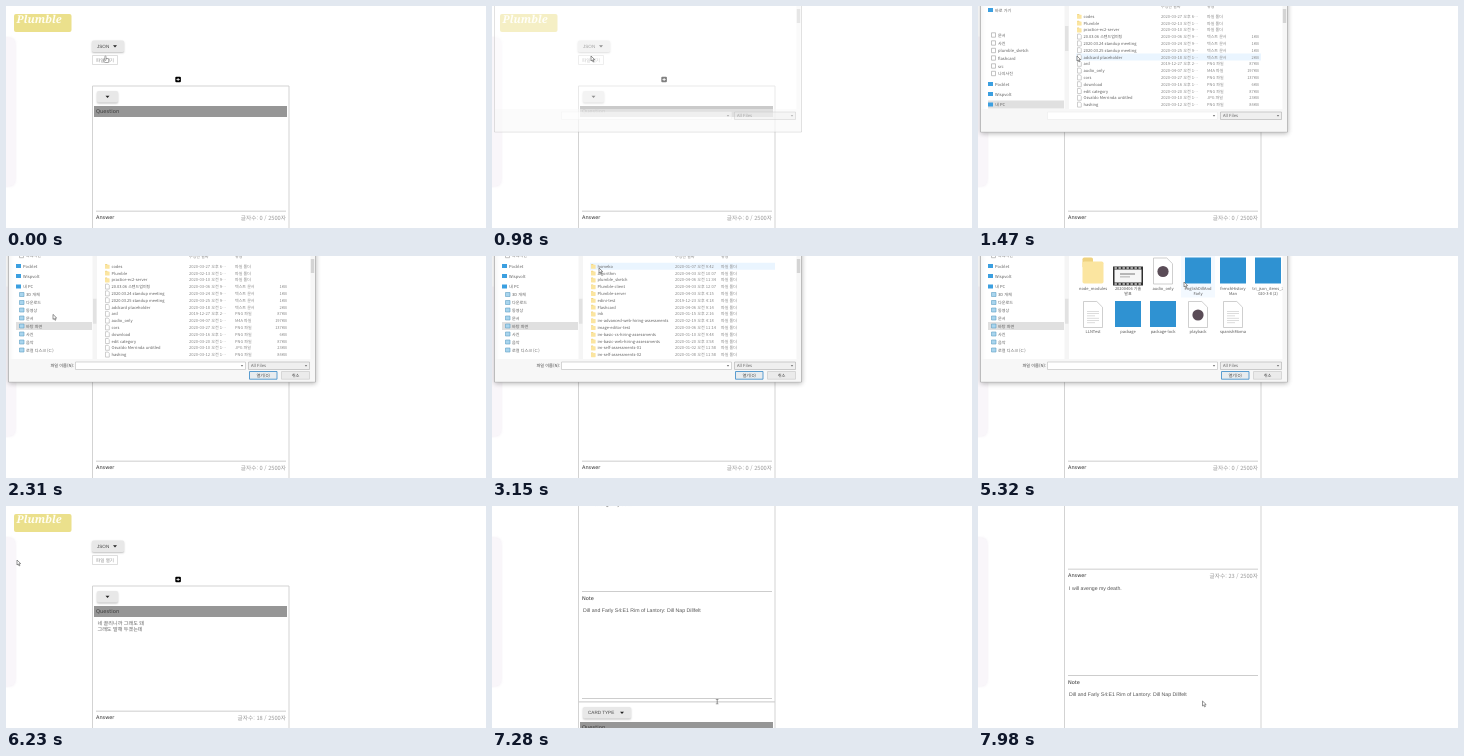
An HTML page with a canvas that plays this animation: 480 by 222 pixels, repeating every 8000 ms.

```html
<!DOCTYPE html>
<html lang="ko">
<head>
<meta charset="utf-8">
<title>Flashcard import</title>
<style>
html, body { margin: 0; width: 100%; height: 100%; overflow: hidden; background: #fff; }
canvas { display: block; width: 480px; height: 222px; }
</style>
</head>
<body>
<canvas id="stage" width="480" height="222"></canvas>
<script>
const ctx = document.getElementById('stage').getContext('2d');
const LOOP = 8000, STEP = 70;
const KR = '"Noto Sans CJK KR", "Noto Sans CJK JP", "Noto Sans CJK", sans-serif';
const WIDE = '"DejaVu Sans", sans-serif';
const UI = '"Liberation Sans", sans-serif';
ctx.textBaseline = 'middle';
ctx.textRendering = 'geometricPrecision';

function text(s, x, y, size = 4, color = '#606060', family = KR, align = 'left', style = '') {
  ctx.font = `${style} ${size}px ${family}`;
  ctx.fillStyle = color;
  ctx.textAlign = align;
  ctx.fillText(s, x, y);
}
function box(x, y, w, h, fill, stroke, radius = 0, line = 0.7) {
  ctx.beginPath();
  ctx.roundRect(x, y, w, h, radius);
  if (fill) { ctx.fillStyle = fill; ctx.fill(); }
  if (stroke) { ctx.strokeStyle = stroke; ctx.lineWidth = line; ctx.stroke(); }
}
function shape(points, fill, stroke) {
  ctx.beginPath();
  points.forEach(([x, y]) => ctx.lineTo(x, y));
  ctx.closePath();
  if (fill) { ctx.fillStyle = fill; ctx.fill(); }
  if (stroke) { ctx.strokeStyle = stroke; ctx.lineWidth = 0.7; ctx.stroke(); }
}
function disc(x, y, r, fill) {
  ctx.beginPath();
  ctx.arc(x, y, r, 0, 7);
  ctx.fillStyle = fill;
  ctx.fill();
}
function shadow(color, blur, dy, draw) {
  ctx.save();
  ctx.shadowColor = color;
  ctx.shadowBlur = blur;
  ctx.shadowOffsetY = dy;
  draw();
  ctx.restore();
}
function clipped(x, y, w, h, draw) {
  ctx.save();
  ctx.beginPath();
  ctx.rect(x, y, w, h);
  ctx.clip();
  draw();
  ctx.restore();
}
// Linear interpolation through [time, value, value...] keys.
function track(t, keys) {
  const i = keys.findIndex(k => k[0] > t);
  if (i < 0) return keys.at(-1).slice(1);
  if (i === 0) return keys[0].slice(1);
  const a = keys[i - 1], b = keys[i], p = (t - a[0]) / (b[0] - a[0]);
  return a.slice(1).map((v, n) => v + (b[n + 1] - v) * p);
}

// ---- Page ----
function dropButton(x, y, w, h, label) {
  shadow('rgba(0,0,0,.25)', 2, 1, () => box(x, y, w, h, '#e8e8e8', null, 1.5));
  const cy = y + h / 2, ax = label ? x + w - 9 : x + w / 2;
  if (label) text(label, x + 5, cy + 0.2, 4.6, '#444', UI);
  shape([[ax - 2, cy - 1], [ax + 2, cy - 1], [ax, cy + 1.2]], '#222');
}
function rule(y) { box(90, y, 190, 0.8, '#bdbdbd'); }

function card(y, { type, question = [], count = 0, answer = '', note = '' }) {
  box(86.5, y, 196.5, 342, '#fff', '#cfcfcf', 0, 0.9);
  dropButton(91, y + 5, type ? 48 : 21, 11.5, type);
  box(88, y + 20, 193, 11, '#969696');
  text('Question', 90, y + 25.7, 5.2, '#3c3c3c', WIDE);
  question.forEach((s, i) => text(s, 91.5, y + 37 + i * 6.2, 5.1));
  rule(y + 124.7);
  text('Answer', 90, y + 132, 5, '#333', WIDE);
  text(`글자수: ${count} / 2500자`, 280, y + 132, 5.7, '#999', KR, 'right');
  text(answer, 91, y + 144.3, 5.2, '#555', UI);
  rule(y + 231.3);
  text('Note', 90, y + 239, 5, '#333', WIDE);
  text(note, 91, y + 251, 5.2, '#555', UI);
  rule(y + 338);
}

function page(t, scroll) {
  const loaded = t >= 6160;
  ctx.save();
  ctx.translate(0, -scroll);
  box(8, 8, 57.5, 18, '#ebe08c', null, 2);
  text('Plumble', 10.5, 14, 10.8, '#fffef2', '"Noto Serif", serif', 'left', 'italic bold');
  dropButton(86, 34.5, 32, 11.5, 'JSON');
  box(86.5, 49.5, 25, 9, '#fff', '#d0d0d0');
  text('파일 열기', 99, 54, 4.5, '#888', KR, 'center');
  box(169.3, 70.7, 5.6, 5.6, '#000', null, 1);
  box(170.5, 73.1, 3.2, 0.8, '#fff');
  box(171.7, 71.9, 0.8, 3.2, '#fff');
  card(80, loaded ? {
    question: ['네 끌리니까 그래도 돼', '그래도 말해 두겠는데'],
    count: scroll ? 23 : 18,
    answer: 'I will avenge my death.',
    note: 'Dill and Farly S4:E1 Rim of Lantory: Dill Nap Dillfelt'
  } : {});
  if (loaded) card(422, { type: 'CARD TYPE' });
  ctx.restore();
  shadow('rgba(170,140,180,.2)', 3, 0, () => box(-8, 32, 17, 148, '#f9f6fa', null, 5));
}

// ---- File dialog ----
const sidebar = [
  [4, '바로 가기', 0], [29, '문서', 1], [37, '사진', 1], [44.5, 'plumble_sketch', 1],
  [52, 'flashcard', 1], [60, 'src', 1], [67.5, '나의사진', 1], [78, 'Pocklet', 0],
  [88, 'Wispvolt', 0], [98.5, '내 PC', 0], [106.5, '3D 개체', 1], [114.5, '다운로드', 1],
  [122, '동영상', 1], [130, '문서', 1], [138, '바탕 화면', 1], [146, '사진', 1],
  [154, '음악', 1], [162, '로컬 디스크 (C:)', 1]
];
const desktop = [
  ['codes', '03-27 오후 6'], ['Plumble', '02-13 오전 1'], ['practice-ec2-server', '03-10 오전 9'],
  ['20.03.06 스탠드업미팅', '03-06 오전 9', '텍스트 문서', '1KB'],
  ['2020.03.24 standup meeting', '03-24 오전 9', '텍스트 문서', '1KB'],
  ['2020.03.25 standup meeting', '03-25 오전 9', '텍스트 문서', '1KB'],
  ['addcard placeholder', '03-18 오전 1', '텍스트 문서', '2KB'],
  ['ard', '12-27 오후 2', 'PNG 파일', '87KB'], ['audio_only', '04-07 오전 1', 'M4A 파일', '197KB'],
  ['cors', '03-27 오전 1', 'PNG 파일', '137KB'], ['download', '03-16 오후 1', 'PNG 파일', '6KB'],
  ['edit category', '03-20 오전 1', 'PNG 파일', '87KB'],
  ['Osvaldo Merrinda untitled', '03-10 오전 1', 'JPG 파일', '23KB'],
  ['hashing', '03-12 오전 1', 'PNG 파일', '84KB']
];
const projects = [
  ['homeko', '01-07 오전 9:42'], ['algorithm', '04-03 오전 10:07'],
  ['plumble_sketch', '04-06 오전 11:34'], ['Plumble-client', '04-03 오후 12:07'],
  ['Plumble-server', '04-03 오후 4:15'], ['edini-test', '12-23 오후 4:18'],
  ['Flashcard', '04-06 오전 9:14'], ['ink', '01-15 오후 2:16'],
  ['im-advanced-web-hiring-assessments', '02-19 오후 4:18'],
  ['image-editor-test', '03-06 오전 11:14'], ['im-basic-cs-hiring-assessments', '01-10 오전 9:48'],
  ['im-basic-web-hiring-assessments', '01-20 오후 3:58'],
  ['im-self-assessments-01', '01-02 오전 11:58'], ['im-self-assessments-02', '01-08 오전 11:58']
];
const files = [
  ['folder', 'node_modules'], ['video', '20200406 기술', '발표'], ['audio', 'audio_only'],
  ['code', 'englishDillAnd', 'Farly'], ['code', 'frenchHistory', 'Man'],
  ['code', 'tri_json_items_2', '020-3-8 (2)'], ['text', 'LLNTest'], ['code', 'package'],
  ['code', 'package-lock'], ['audio', 'playback'], ['text', 'spanishMoma']
];

function folder(x, y, w, h) {
  box(x, y, w * 0.5, h * 0.4, '#efd27f', null, w / 12);
  box(x, y + h * 0.15, w, h * 0.85, '#fbe5a0', null, w / 12);
}
function sheet(x, y, w, h) {
  const fold = w * 0.3;
  shape([[x, y], [x + w - fold, y], [x + w, y + fold], [x + w, y + h], [x, y + h]], '#fff', '#bbb');
}

function drawSidebar(t) {
  const [scroll] = track(t, [[1890, 0], [2170, 68]]);
  const selected = t < 2240 ? 98.5 : 138;
  clipped(3, 0, 88, 103, () => {
    for (const [pageY, label, level] of sidebar) {
      const y = pageY - scroll, x = 10 + level * 3;
      if (pageY === selected) box(10, y - 4, 76, 8, '#e0e0e0');
      if (!level) box(x, y - 2, 5, 4, '#3b9fe0');
      else if (pageY < 70) box(x + 0.5, y - 2.2, 4, 4.4, '#fff', '#aaa');
      else box(x + 0.5, y - 2, 4.5, 4, '#a9d5ee', '#5f9fc4', 0, 0.6);
      text(label, x + 7, y, 4.1);
    }
  });
  box(86.5, 0, 4.5, 103, '#f5f5f5');
  box(87, 20 + scroll / 3, 3.5, 25, '#e2e2e2');
}

function drawRows(t, rows) {
  const hover = t < 1820 ? 6 : t < 2870 ? -1 : Math.floor(track(t, [[3290, 0], [4060, 6]])[0]);
  text('수정한 날짜', 183, 0.5, 4, '#888');
  text('유형', 229, 0.5, 4, '#888');
  rows.forEach(([name, date, kind = '파일 폴더', size = ''], i) => {
    const y = 10.2 + i * 6.8;
    if (i === hover) box(98, y - 3.5, 185, 7, t >= 4340 ? '#cce8ff' : '#eaf5ff');
    if (kind === '파일 폴더') folder(99, y - 2.2, 4.6, 4.8);
    else sheet(99.5, y - 2.5, 3.8, 5);
    text(name, 105.5, y);
    const year = date.startsWith('12') ? 2019 : 2020;
    text(`${year}-${date}${rows === desktop ? '…' : ''}`, 183, y, 4.1, '#888');
    text(kind, 229, y, 4, '#888');
    text(size, 281, y, 4, '#888', KR, 'right');
  });
}

function drawIcons(t) {
  files.forEach(([kind, name, more], i) => {
    const x = 115 + i % 6 * 35, y = i < 6 ? 14.5 : 58;
    if (i === 3) box(x - 17, y - 17, 34, 44, t >= 5530 ? '#cce8ff' : '#f3f9ff');
    if (kind === 'folder') folder(x - 10.5, y - 13, 21, 26);
    if (kind === 'code') box(x - 13, y - 13, 26, 26, '#2f92d2');
    if (kind === 'video') {
      box(x - 15, y - 4, 30, 19, '#303030');
      box(x - 13.5, y - 1, 27, 13, '#f6f6f6');
      for (let n = 0; n < 7; n++) {
        box(x - 13.5 + n * 4, y - 3.2, 2.4, 1.4, '#ddd');
        box(x - 13.5 + n * 4, y + 12.8, 2.4, 1.4, '#ddd');
      }
      box(x - 8, y + 3, 15, 1, '#777');
      box(x - 8, y + 6, 10, 0.8, '#999');
    }
    if (kind === 'audio' || kind === 'text') sheet(x - 9.5, y - 12.5, 19, 26);
    if (kind === 'audio') disc(x, y + 1, 5.6, '#5a4c57');
    if (kind === 'text') for (let n = 0; n < 6; n++) box(x - 6, y - 3 + n * 2.3, n % 3 === 2 ? 8 : 12, 0.6, '#c4c4c4');
    text(name, x, y + 17.8, 4, '#555', KR, 'center');
    if (more) text(more, x, y + 23.3, 4, '#555', KR, 'center');
  });
}

function dialog(t) {
  const alpha = t < 1260 ? track(t, [[840, 0], [1120, 1]])[0] : t < 6160 ? 1 : t < 6230 ? 0.4 : 0;
  if (!alpha) return;
  ctx.save();
  ctx.globalAlpha = alpha;
  const frame = () => box(2.5, -10, 307, 136, '#fff', '#aaa');
  if (alpha < 1) frame();
  else shadow('rgba(0,0,0,.28)', 5, 1, frame);
  box(3, 103, 306, 22.6, '#f7f7f7');
  if (t >= 1260) drawSidebar(t);
  clipped(92, 0, 216, 103, () => {
    if (t >= 4550) drawIcons(t);
    else if (t >= 3150) drawRows(t, projects);
    else if (t >= 1260) drawRows(t, desktop);
  });
  box(304.5, 0, 4, 103, '#f6f6f6');
  if (t < 4550) box(304.8, 3, 3.4, 14, '#d4d4d4');
  box(69.5, 106, 170, 7.5, '#fff', t >= 1540 ? '#c4c4c4' : '#eee');
  box(242.5, 106, 61, 7.5, '#efefef', '#b8b8b8');
  text('All Files', 245, 109.8, 4.2);
  for (const x of [236, 300]) shape([[x - 1.2, 109], [x + 1.2, 109], [x, 110.8]], '#777');
  if (t >= 1540) {
    text('파일 이름(N):', 68, 109.8, 4.2, '#444', KR, 'right');
    box(243.5, 115.5, 27.5, 7.7, '#e8ecef', '#4a94cc', 0, 0.9);
    text('열기(O)', 257.2, 119.4, 4.2, '#444', KR, 'center');
    box(275.5, 115.5, 28, 7.7, '#ebebeb', '#ccc');
    text('취소', 289.5, 119.4, 4.2, '#444', KR, 'center');
  }
  if (t >= 5530) text('englishDillAndFarly', 72, 109.8, 4.2);
  ctx.restore();
}

// ---- Pointer ----
function pointer(t) {
  const [x, y] = track(t, [
    [0, 99, 50], [1750, 99, 50], [2030, 32, 70], [2240, 32, 70], [2590, 107, 12],
    [3220, 107, 12], [4060, 118, 48], [4550, 118, 48], [5320, 206, 26], [5740, 206, 26],
    [6020, 150, 48], [6230, 11, 54], [6720, 11, 54], [7000, 224.5, 195]
  ]);
  if (t < 910) {
    box(x - 1, y + 2.5, 4.8, 4, '#fff', '#666', 1.2, 0.6);
    box(x - 0.2, y, 1.3, 4.5, '#fff', '#666', 0.6, 0.5);
  } else if (t >= 7140 && t < 7700) {
    box(x + 0.3, y - 2, 0.7, 5, '#666');
    box(x - 0.7, y - 2, 2.7, 0.6, '#777');
    box(x - 0.7, y + 2.6, 2.7, 0.6, '#777');
  } else {
    const arrow = [[0, 0], [0, 5], [1.2, 4], [2, 5.9], [2.9, 5.5], [2.1, 3.7], [3.7, 3.6]];
    shape(arrow.map(([dx, dy]) => [x + dx, y + dy]), '#fff', '#666');
  }
}

function render(now) {
  const t = Math.floor(now % LOOP / STEP) * STEP;
  const [scroll] = track(t, [[7070, 0], [7280, 226], [7630, 226], [7840, 150], [7910, 150], [7980, 142]]);
  ctx.fillStyle = '#fff';
  ctx.fillRect(0, 0, 480, 222);
  page(t, scroll);
  dialog(t);
  pointer(t);
}
const start = performance.now();
function tick() {
  render(performance.now() - start);
  requestAnimationFrame(tick);
}
tick();
</script>
</body>
</html>
```
